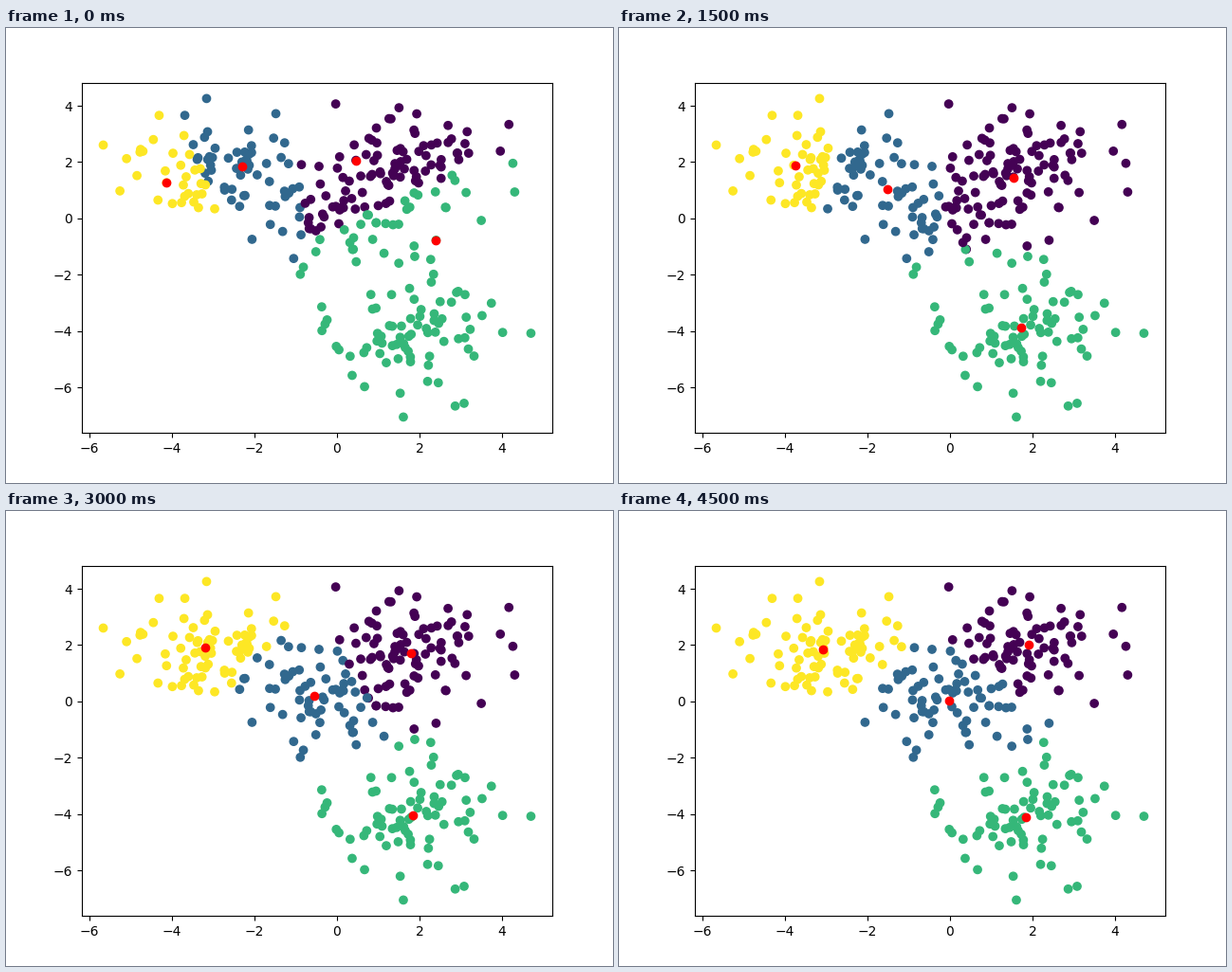
Recreate the animation shown at these times as a matplotlib script. Size 640 by 480 pixels, loop 5 s.

```python
import numpy as np
import matplotlib.pyplot as plt
from matplotlib.animation import FuncAnimation

FRAMES = 10
INTERVAL = 500
BLOBS = [[0, 0], [2, 2], [-3, 2], [2, -4]]
SEEDS = [[0.46, 2.04], [-2.28, 1.83], [2.40, -0.78], [-4.13, 1.27]]


def make_points(per_blob=75):
    """Four unit-variance Gaussian blobs in shuffled drawing order."""
    rng = np.random.RandomState(0)
    pts = np.concatenate([rng.normal(c, 1.0, (per_blob, 2)) for c in BLOBS])
    order = np.arange(len(pts))
    rng.shuffle(order)
    return pts[order]


def distances(a, b):
    return np.linalg.norm(a[:, None] - b[None], axis=2)


def assign(pts, centers):
    return distances(pts, centers).argmin(axis=1)


def means(pts, labels):
    return np.array([pts[labels == k].mean(axis=0) for k in range(len(SEEDS))])


def lloyd_steps(pts):
    """Labels and centers for every step of k-means."""
    # each starting center is the data point closest to its seed
    centers = pts[distances(np.array(SEEDS), pts).argmin(axis=1)]
    labels = assign(pts, centers)
    steps = [(labels, centers)]
    while len(steps) < FRAMES:
        centers = means(pts, labels)
        steps.append((labels, centers))
        labels = assign(pts, centers)
    return steps


points = make_points()
steps = lloyd_steps(points)

fig, ax = plt.subplots(figsize=(6.4, 4.8), dpi=100)
dots = ax.scatter(*points.T, c=steps[0][0], cmap="viridis", vmin=0, vmax=3)
marks = ax.scatter(*steps[0][1].T, c="r")


def update(i):
    labels, centers = steps[i]
    dots.set_array(labels)
    marks.set_offsets(centers)
    return dots, marks


anim = FuncAnimation(fig, update, frames=FRAMES, interval=INTERVAL,
                     repeat=True, repeat_delay=0)
plt.show()
```
